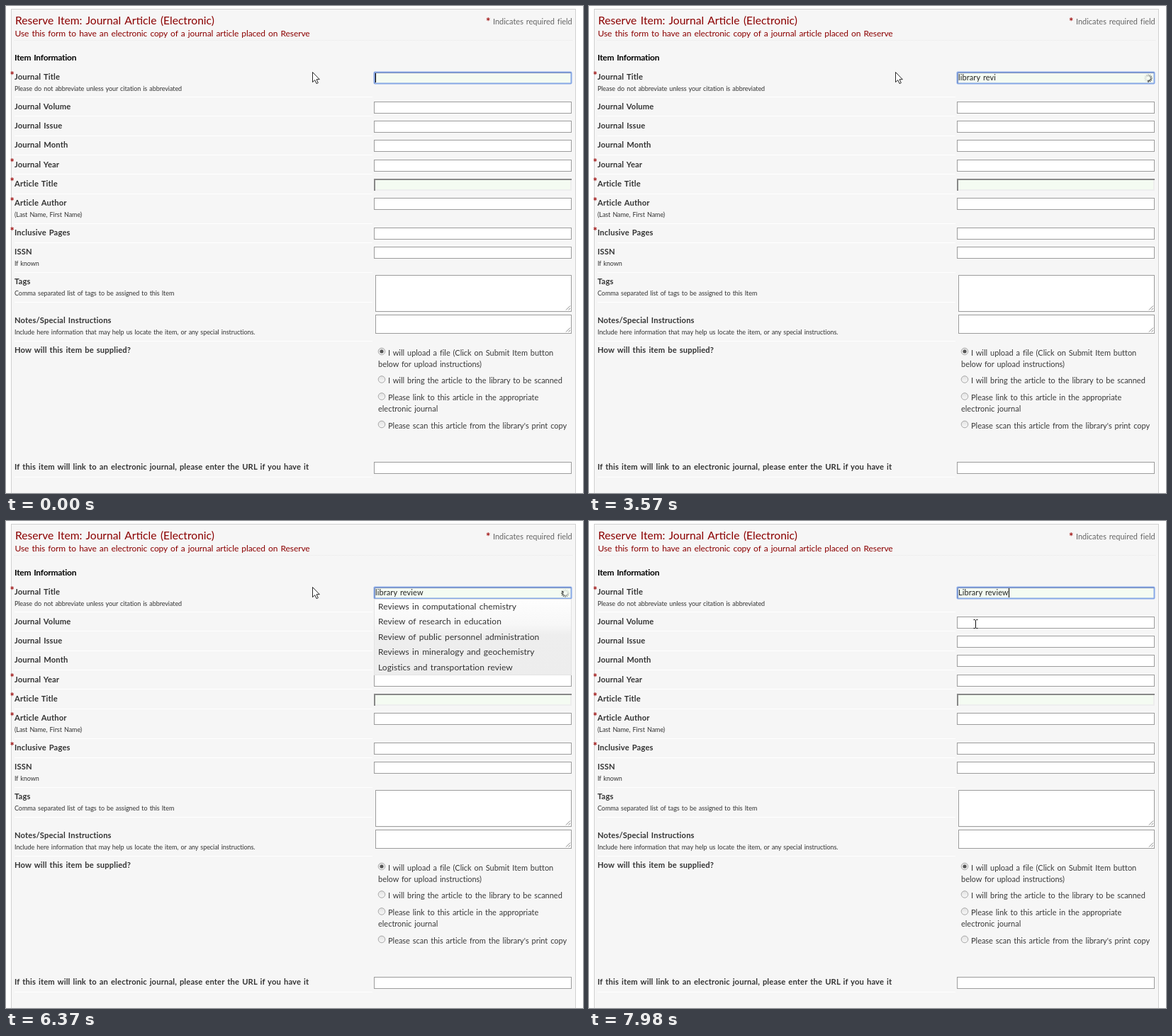
Recreate the animation shown at these times as an HTML page. Size 814 by 688 pixels, loop 8000 ms.

```html
<!DOCTYPE html>
<html lang="en">
<head>
<meta charset="utf-8">
<title>Reserve form</title>
<style>
  html, body { margin: 0; width: 100%; height: 100%; overflow: hidden; background: #fff; }
  svg { display: block; width: 814px; height: 688px; }
  text { font: 11px Lato, "Open Sans", sans-serif; fill: #3a3a3a; letter-spacing: -.02px; word-spacing: .1em; white-space: pre; }
  .title { font-size: 15.6px; letter-spacing: 0; fill: #8b0000; }
  .sub { font-size: 12px; letter-spacing: -.1px; fill: #8b0000; }
  .section { font-size: 12px; font-weight: 700; letter-spacing: -.25px; fill: #000; }
  .label { font-size: 11.2px; font-weight: 700; letter-spacing: .14px; fill: #333; }
  .hint { font-size: 9px; letter-spacing: -.07px; fill: #333; }
  .grey { fill: #666; }
  .star { font-size: 15px; font-weight: 700; fill: #a01010; }
  .item { font-size: 12px; letter-spacing: .07px; fill: #333; }
  .item.on { fill: #c77405; }
  .typed { letter-spacing: .1px; fill: #222; }
  .box { fill: #fff; stroke: #9c9c9c; }
  .rule { stroke: #fff; }
  .grip { stroke: #888; fill: none; }
</style>
</head>
<body>
<svg viewBox="0 0 814 688">
  <defs>
    <linearGradient id="menuFill" gradientUnits="userSpaceOnUse" x1="0" y1="110" x2="0" y2="218">
      <stop offset="0" stop-color="#fefefe"/>
      <stop offset=".34" stop-color="#f7f7f7"/>
      <stop offset=".47" stop-color="#eee"/>
      <stop offset="1" stop-color="#ededed"/>
    </linearGradient>
    <linearGradient id="hoverFill" x2="0" y2="1">
      <stop offset="0" stop-color="#fef6d3"/>
      <stop offset="1" stop-color="#fdefbd"/>
    </linearGradient>
    <linearGradient id="radioFill" x2="0" y2="1">
      <stop offset="0" stop-color="#e2e2e2"/>
      <stop offset="1" stop-color="#f8f8f8"/>
    </linearGradient>
  </defs>

  <rect x="7.5" y="4.5" width="796" height="700" fill="#f6f6f6" stroke="#d0d0d0"/>
  <path d="M12 48.5H800" stroke="#e9e9e9" stroke-dasharray="1 1"/>
  <g id="form"></g>

  <!-- article title: inset border -->
  <rect x="519" y="244" width="279" height="17" fill="#f4fbf2"/>
  <path d="M519 260H797V244" fill="none" stroke="#eee" stroke-width="2"/>
  <path d="M520 261V245H798" fill="none" stroke="#888" stroke-width="2"/>

  <!-- focused journal title -->
  <rect x="519.5" y="93.5" width="278" height="16" rx="1" fill="#f4fbf2" stroke="#86a7e6" stroke-width="2"/>
  <path d="M520.5 109V94.5H797" fill="none" stroke="#7488b8"/>
  <text id="typed" class="typed" x="521" y="105"></text>
  <rect id="caret" y="95" width="1" height="13" fill="#000"/>
  <g id="spinner"></g>

  <g id="menu">
    <rect id="menuBox" x="519.5" y="110.5" height="107" fill="url(#menuFill)" stroke="#e3e3e3"/>
    <rect id="hover" x="519.5" y="131.5" width="280" height="22" fill="url(#hoverFill)" stroke="#e0c97f"/>
    <g id="items"></g>
  </g>

  <path id="arrow" d="M.5 .5V14.6L3.8 11.6 6 16.6 8.3 15.6 6.1 10.7H10.3Z" fill="#fff" stroke="#111" stroke-width=".9"/>
  <path id="hand" fill="#fff" stroke="#111" stroke-width=".9" stroke-linejoin="round"
    d="M4 11V2Q4 .6 5 .6T6 2V7.5Q6.2 6.1 7.3 6.2T8.4 7.4V8Q8.6 6.8 9.6 7T10.5 8.2V8.8Q11 7.8 11.8 8.2T12.3 9.6V13Q12 15.5 11 18H4.6Q3.5 15.5 1 11.8 .3 10.2 1.3 9.6T4 11Z"/>
  <path id="beam" d="M542.5 139.5H544.5L545.5 140.5 546.5 139.5H548.5M545.5 140V151M542.5 151.5H544.5L545.5 150.5 546.5 151.5H548.5" fill="none" stroke="#111"/>
</svg>
<script>
const LOOP = 8000, STEP = 70;
const $ = id => document.getElementById(id);

function add(parent, tag, attrs, text) {
  const el = document.createElementNS('http://www.w3.org/2000/svg', tag);
  for (const k in attrs) el.setAttribute(k, attrs[k]);
  if (text) el.textContent = text;
  return parent.appendChild(el);
}

const form = $('form');
const write = (cls, x, y, s) => add(form, 'text', { class: cls, x, y }, s);
const box = (x, y, w, h) => add(form, 'rect', { class: 'box', x, y, width: w, height: h });

write('title', 13, 26, 'Reserve Item: Journal Article (Electronic)');
write('sub', 12.5, 42.5, 'Use this form to have an electronic copy of a journal article placed on Reserve');
write('star', 677, 26.5, '*');
write('grey', 687, 25.5, 'Indicates required field');
write('section', 12, 76.5, 'Item Information');

// label, baseline, required, hint, input top, rule below
const rows = [
  ['Journal Title', 104, 1, 'Please do not abbreviate unless your citation is abbreviated', 0, 128],
  ['Journal Volume', 146, 0, '', 135, 155],
  ['Journal Issue', 173, 0, '', 162, 183],
  ['Journal Month', 200, 0, '', 189, 210],
  ['Journal Year', 227.5, 1, '', 217, 237],
  ['Article Title', 254.5, 1, '', 0, 265],
  ['Article Author', 282, 1, '(Last Name, First Name)', 271, 307],
  ['Inclusive Pages', 324, 1, '', 313, 334],
  ['ISSN', 351, 0, 'If known', 340, 376],
  ['Tags', 393, 0, 'Comma separated list of tags to be assigned to this Item', 0, 418],
  ['Notes/Special Instructions', 448, 0, 'Include here information that may help us locate the item, or any special instructions.', 0, 473],
  ['How will this item be supplied?', 490, 0, '', 0, 0],
  ['If this item will link to an electronic journal, please enter the URL if you have it', 655, 0, '', 644, 665]
];
for (const [label, y, required, hint, top, rule] of rows) {
  write('label', 12, y, label);
  if (required) write('star', 5.5, y - 1.5, '*');
  if (hint) write('hint', 12, y + 16.2, hint);
  if (top) box(519.5, top + .5, 278, 16);
  if (rule) add(form, 'path', { class: 'rule', d: `M12 ${rule + .5}H517` });
}

for (const [y, h] of [[380.5, 51], [436.5, 26]]) {
  box(521.5, y, 276, h);
  add(form, 'path', { class: 'grip', d: `M790 ${y + h - 2}l6 -6M793.5 ${y + h - 2}l2.5 -2.5` });
}

for (const y of [488, 527.5, 551.5, 591])
  add(form, 'circle', { cx: 530, cy: y, r: 4.8, fill: 'url(#radioFill)', stroke: '#a8a8a8' });
add(form, 'circle', { cx: 530, cy: 488, r: 2.6, fill: '#555' });
write('', 539, 494, 'I will upload a file (Click on Submit Item button');
write('', 525, 509.5, 'below for upload instructions)');
write('', 539, 533, 'I will bring the article to the library to be scanned');
write('', 539, 557, 'Please link to this article in the appropriate');
write('', 525, 573, 'electronic journal');
write('', 539, 597, "Please scan this article from the library's print copy");

const lists = [
  ['Reviews in computational chemistry', 'Review of research in education',
   'Review of public personnel administration', 'Reviews in mineralogy and geochemistry',
   'Logistics and transportation review'],
  ['Business library review', 'Library review', 'The International information and library review',
   'Business library review international', 'Health libraries review']
];
const items = lists[0].map((s, i) => add($('items'), 'text', { class: 'item', x: 525, y: 125 + i * 21.4 }));

const spokes = [];
for (let i = 0; i < 12; i++)
  spokes.push(add($('spinner'), 'path', {
    d: 'M0 -2.8V-5.8', stroke: '#222', 'stroke-width': 1.4,
    transform: `translate(789 102) rotate(${i * 30})`
  }));

const query = 'library review';
const keys = [910, 1050, 1120, 1190, 1400, 1540, 1680, 2100, 2380, 2450, 2730, 2870, 4690, 4760];
const caretOff = [[490, 910], [3360, 3640], [4130, 4620], [5250, 5740], [6230, 6440], [6930, 7420]];
const loading = [[3290, 3640], [5250, 6440]];
const PICK = 7910;

// time, x, y of the pointer
const path = [
  [0, 432, 93], [6580, 431, 89], [6650, 428, 80], [6720, 425, 69], [6790, 421, 61], [6860, 420, 58],
  [6930, 420, 62], [7000, 420, 70], [7070, 420, 77], [7350, 425, 79], [7420, 445, 88],
  [7490, 478, 103], [7560, 510, 121], [7630, 538, 136], [7700, 547, 142]
];

const within = (t, spans) => spans.some(([a, b]) => t >= a && t < b);
const show = (id, on) => $(id).setAttribute('visibility', on ? 'visible' : 'hidden');

function draw(t) {
  const picked = t >= PICK;
  const typed = $('typed');
  typed.textContent = picked ? 'Library review' : query.slice(0, keys.filter(k => t >= k).length);
  const width = typed.textContent ? typed.getComputedTextLength() : 0;
  $('caret').setAttribute('x', 521 + Math.round(width));
  show('caret', !within(t, caretOff));

  const busy = within(t, loading);
  show('spinner', busy);
  if (busy) {
    const head = Math.floor(t / STEP) + 3;
    spokes.forEach((el, i) => {
      const age = (head - i) % 12;
      el.setAttribute('opacity', Math.max(.12, 1 - age / 9));
    });
  }

  const found = t >= 6440;
  const hovering = t >= 7630 && !picked;
  $('menu').style.display = t >= 3640 && !picked ? '' : 'none';
  $('menuBox').setAttribute('width', found ? 280 : 278);
  $('hover').style.display = hovering ? '' : 'none';
  items.forEach((el, i) => {
    el.textContent = lists[+found][i];
    el.classList.toggle('on', hovering && i === 1);
  });

  const [, x, y] = path.filter(p => t >= p[0]).pop();
  $('arrow').setAttribute('transform', `translate(${x} ${y})`);
  $('hand').setAttribute('transform', `translate(${x - 4} ${y})`);
  show('arrow', t < 7630);
  show('hand', t >= 7630 && t < 7980);
  show('beam', t >= 7980);
}

const start = performance.now();
function tick() {
  draw((performance.now() - start) % LOOP);
  requestAnimationFrame(tick);
}
draw(0);
requestAnimationFrame(tick);
</script>
</body>
</html>
```
